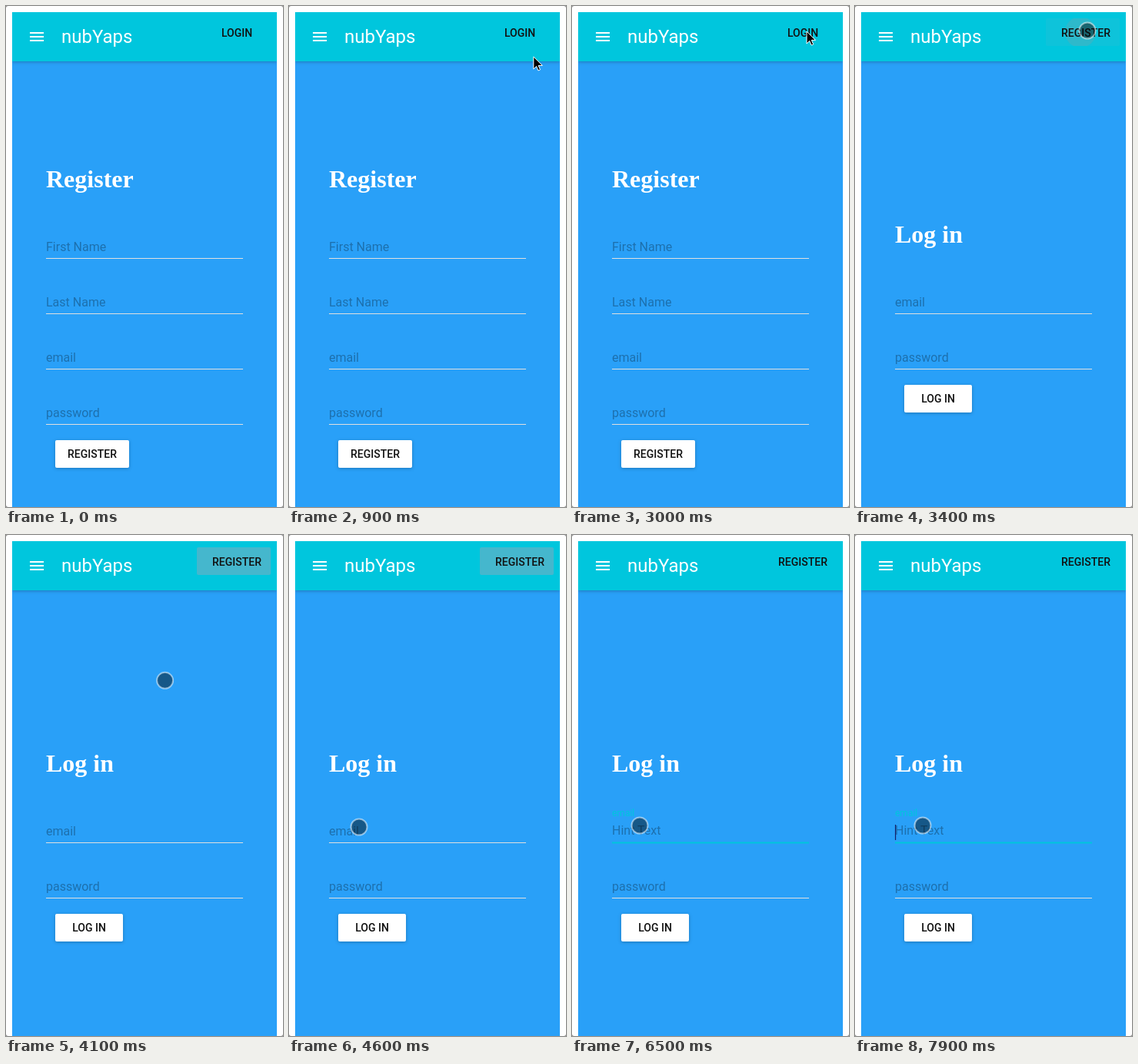
An HTML page that plays this animation: 360x652 px, repeating every 8 s.

```html
<!DOCTYPE html>
<html lang="en">
<head>
<meta charset="utf-8">
<title>Sign in</title>
<style>
html, body { margin: 0; width: 100%; height: 100%; overflow: hidden; background: #888; }
svg { display: block; font: 16px Roboto, sans-serif; }
.title { font-size: 24px; fill: #fff; }
.button { font-size: 14px; font-weight: 500; fill: #111; }
h1, .heading { font: bold 32px "Liberation Serif", serif; fill: #fff; }
.hint { fill: #000; fill-opacity: .3; }
.card { fill: #fff; filter: drop-shadow(0 1px 2px rgba(0,0,0,.25)); }
.bar { fill: #00c6dd; filter: drop-shadow(0 1px 2px rgba(0,0,0,.25)); }
</style>
</head>
<body>
<svg width="360" height="652" viewBox="0 0 360 652">
  <clipPath id="buttonClip"><rect x="248" y="16" width="96" height="36" rx="2"/></clipPath>
  <clipPath id="page"><rect x="8" y="8" width="344" height="644"/></clipPath>
  <rect width="360" height="652" rx="3" fill="#fff"/>
  <g clip-path="url(#page)">
    <rect x="8" y="8" width="344" height="644" fill="#29a0f8"/>
    <rect class="bar" x="8" y="8" width="344" height="64"/>
  </g>
  <path d="M31 34h18v2H31zm0 5h18v2H31zm0 5h18v2H31z" fill="#fff"/>
  <text class="title" x="72" y="48">nubYaps</text>
  <g clip-path="url(#buttonClip)">
    <rect id="hover" x="248" y="16" width="96" height="36" fill="#99a5b9"/>
    <circle id="ripple" cx="293" cy="34" fill="#999"/>
  </g>
  <text id="nav" class="button" x="300" y="40" text-anchor="middle"></text>
  <g id="register"></g>
  <g id="login"></g>
  <g id="focus">
    <text id="hint" class="hint" x="52" y="390">Hint Text</text>
    <rect id="line" y="399.5" height="2" fill="#00c6dd"/>
    <rect id="caret" x="52" y="377" width="1.2" height="20" fill="#14206a"/>
  </g>
  <path id="arrow" d="M0 0v16l3.7-3.6 2.4 5.6 2.6-1.1-2.4-5.5h5.2z" fill="#000" stroke="#fff"/>
  <circle id="touch" r="10.5" fill="#000" fill-opacity=".45" stroke="#fff" stroke-opacity=".5" stroke-width="2"/>
</svg>
<script>
const $ = id => document.getElementById(id);
const set = (id, attrs) => { for (const k in attrs) $(id).setAttribute(k, attrs[k]); };
const show = (id, on) => set(id, { visibility: on ? 'visible' : 'hidden' });

function form(id, top, heading, fields, label, width) {
  const rows = fields.map((name, i) => {
    const y = top + 83 + i * 72;
    return `<text class="hint" x="52" y="${y}">${name}</text>
      <rect x="52" y="${y + 9}" width="256" height="1" fill="#e0e0e0"/>`;
  });
  const y = top + 41 + fields.length * 72;
  $(id).innerHTML = `<text class="heading" x="52" y="${top}">${heading}</text>${rows.join('')}
    <rect class="card" x="64" y="${y}" width="${width}" height="36" rx="2"/>
    <text class="button" x="${64 + width / 2}" y="${y + 23}" text-anchor="middle">${label}</text>`;
}
form('register', 236, 'Register', ['First Name', 'Last Name', 'email', 'password'], 'REGISTER', 96);
form('login', 308, 'Log in', ['email', 'password'], 'LOG IN', 88);
const email = $('login').querySelector('.hint');

const LOOP = 8000, SWAP = 3300, HOVER = 3380, FOCUS = 4790;
const span = (t, a, b) => Math.min(1, Math.max(0, (t - a) / (b - a)));
const out = (t, start) => 1 - (1 - span(t, start, start + 450)) ** 5;
const smooth = x => x * x * (3 - 2 * x);

// Pointer stops: time, x, y
const stops = [[500, 352, 150], [1100, 306, 37], [2500, 306, 37], [2900, 305, 33], [3100, 305, 33],
  [3300, 302, 32], [3750, 302, 32], [4500, 91, 380], [4620, 91, 380], [4800, 88, 378], [LOOP, 88, 378]];
function pointer(t) {
  const i = Math.max(1, stops.findIndex(s => s[0] > t));
  const [a, x, y] = stops[i - 1], [b, x2, y2] = stops[i];
  const k = smooth(span(t, a, b));
  return `translate(${x + (x2 - x) * k} ${y + (y2 - y) * k})`;
}

function draw(t) {
  const swapped = t >= SWAP, focused = t >= FOCUS, f = out(t, FOCUS);
  show('register', !swapped);
  show('login', swapped);
  $('nav').textContent = swapped ? 'REGISTER' : 'LOGIN';

  set('hover', { opacity: .45 * out(t, HOVER) * (1 - out(t, 4700)) });
  const r = span(t, 3150, 3750);
  set('ripple', { r: 48 * r, opacity: r > 0 ? .4 * (1 - r) : 0 });

  email.setAttribute('transform', `translate(${52 * .25 * f} ${(366 - 391 * .75) * f}) scale(${1 - .25 * f})`);
  email.style.fill = focused ? '#00c6dd' : '';
  email.style.fillOpacity = focused ? 1 : '';
  show('focus', focused);
  set('hint', { opacity: f });
  set('line', { x: 180 - 128 * f, width: 256 * f });
  show('caret', focused && (t - FOCUS) % 1000 < 500);

  show('arrow', t >= 500 && t < 3100);
  show('touch', t >= 3100);
  const at = pointer(t);
  set('arrow', { transform: at });
  set('touch', { transform: at });
}

function tick() {
  draw(performance.now() % LOOP);
  requestAnimationFrame(tick);
}
tick();
</script>
</body>
</html>
```
